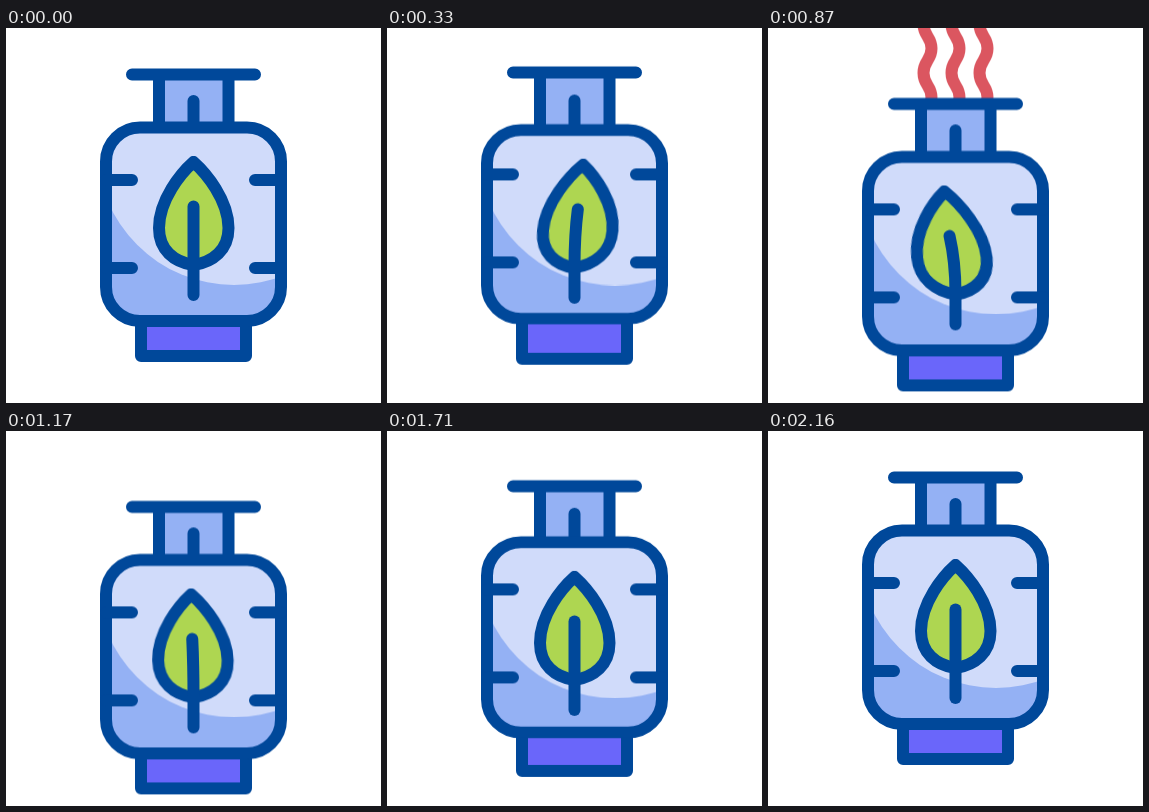
Recreate the animation shown at these times as an HTML page without scripts. Size 375 by 375 pixels, loop 2250 ms.

```html
<!DOCTYPE html>
<html lang="en">
<head>
<meta charset="utf-8">
<title>Eco gas cylinder</title>
<style>
  html, body { margin: 0; width: 100%; height: 100%; overflow: hidden; background: #fff; }
  svg { display: block; width: 100vw; height: 100vh; }

  .line { fill: none; stroke: #00489a; stroke-width: 12; stroke-linecap: round; stroke-linejoin: round; }
  .light { fill: #d0dbfa; }
  .shade { fill: #94b1f4; }
  .foot { fill: #6a66fa; }
  .green { fill: #aed651; }
  .smoke { fill: none; stroke: #db5660; stroke-width: 12; stroke-linecap: round; stroke-linejoin: round; }

  .hop, .sway, .stem, .smoke {
    animation: hop 2250ms cubic-bezier(.333, 0, .667, 1) infinite;
  }
  .sway { animation-name: sway; transform-origin: 187.5px 237px; }
  .stem { animation-name: bend; }
  .smoke { animation-name: rise; }

  /* Each part hops to its own height; the shell also squashes at the top */
  .hop { --peak: -12px; --squash: 1; transform-origin: 187.5px 196.25px; }
  .plate { --peak: -19.5px; }
  .notch { --peak: -17px; }
  .shell { --peak: -16.2px; --squash: .961; }
  .curve { --peak: -15.5px; }
  .ticks { --peak: -25px; }

  @keyframes hop {
    0%, 96%, 100% { transform: translateY(0) scaleY(1); }
    9.333%, 82.667% { transform: translateY(var(--peak)) scaleY(var(--squash)); }
    22.667%, 70.667% { transform: translateY(29.4px) scaleY(1); }
  }
  @keyframes sway {
    0%, 57.333%, 100% { transform: skewX(0deg); }
    21.333% { transform: skewX(-6deg); }
    39.333% { transform: skewX(6deg); }
  }
  @keyframes bend {
    0%, 57.333%, 100% { d: path("M187.5 267V236C187.5 215 187.5 198 187.5 178.500"); }
    21.333% { d: path("M187.5 267V236C187.5 215 188.5 198 191.8 178.500"); }
    39.333% { d: path("M187.5 267V236C187.5 215 186 198 181.500 178.500"); }
  }
  @keyframes rise {
    0%, 24% { transform: translateY(84px); }
    56%, 100% { transform: translateY(-172px); }
  }
</style>
</head>
<body>
<svg viewBox="0 0 375 375">
  <defs>
    <path id="wisp" d="M4 0C4 12 -4 12 -4 24.500S4 37 4 49S-4 61 -4 73.500S4 86 4 98S-4 110 -4 122.500S4 135 4 147"/>
    <clipPath id="inside"><rect class="hop shell" x="100" y="99.500" width="175" height="193.500" rx="34"/></clipPath>
  </defs>

  <g class="smoke">
    <use href="#wisp" x="159.500"/>
    <use href="#wisp" x="187.500"/>
    <use href="#wisp" x="215.500"/>
  </g>

  <g class="hop plate">
    <path class="shade" d="M153 46.500H222.500V125H153Z"/>
    <path class="line" d="M153 46.500V125M222.500 46.500V125M126 46.500H249"/>
  </g>
  <path class="hop notch line" d="M187.500 73V115"/>

  <rect class="hop foot line" style="fill:#6a66fa" x="135" y="270" width="105" height="58"/>

  <rect class="hop shell shade" x="100" y="99.500" width="175" height="193.500" rx="34"/>
  <g clip-path="url(#inside)">
    <circle class="hop curve light" cx="228" cy="120" r="137"/>
  </g>
  <rect class="hop shell line" x="100" y="99.500" width="175" height="193.500" rx="34"/>

  <path class="hop ticks line" d="M100 152H126M249 152H275M100 240H126M249 240H275"/>

  <g class="hop">
    <path class="sway green line" style="fill:#aed651" d="M187.500 134C175 145 153 172 153 200C153 222 168 234 187.500 237C207 234 222.500 222 222.500 200C222.500 172 200 145 187.500 134Z"/>
    <path class="stem line" d="M187.500 267V236C187.500 215 187.500 198 187.500 178.500"/>
  </g>
</svg>
</body>
</html>
```
